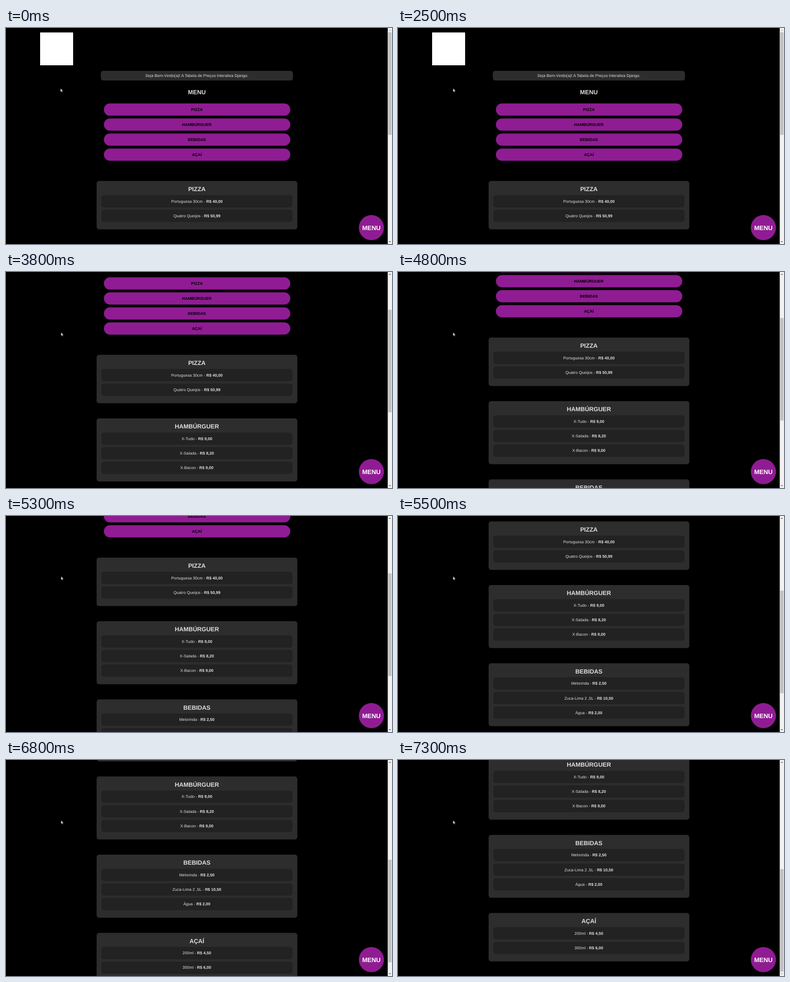
An HTML page that plays this animation: 690x388 px, repeating every 8 s.

```html
<!DOCTYPE html>
<html lang="pt-BR">
<head>
<meta charset="utf-8">
<title>Tabela de Preços</title>
<style>
  html, body { margin: 0; width: 100%; height: 100%; overflow: hidden; background: #000; }
  svg { display: block; width: 690px; height: 388px; }
  text {
    font: 7.19px "Liberation Sans", Arial, sans-serif;
    fill: #dedede;
    text-anchor: middle;
    text-rendering: geometricPrecision;
  }
  .bold { font-weight: bold; }
  .title { font-size: 10.78px; font-weight: bold; }
  .label { font-weight: bold; fill: #000; }
  .float { font-size: 11.23px; font-weight: bold; fill: #fff; }
  .panel { fill: #2d2d2d; }
  .item { fill: #222; }
  .purple { fill: #901c93; }
  #cursor { animation: nudge 8s step-end infinite; }
  @keyframes nudge {
    0% { transform: translate(97.5px, 108.5px); }
    31.25%, 100% { transform: translate(98.4px, 108.5px); }
  }
</style>
</head>
<body>
<svg viewBox="0 0 690 388">
  <rect width="690" height="388"/>
  <g id="page">
    <rect x="61" y="8" width="59" height="59" fill="#fff"/>
    <rect class="panel" x="169.5" y="77" width="343.5" height="17.2" rx="4.5"/>
    <text x="341.2" y="87.9">Seja Bem-Vindo(a)! A Tabela de Preços Interativa Django.</text>
    <text class="title" x="341.2" y="119.4">MENU</text>
  </g>
  <circle class="purple" cx="653.2" cy="358.6" r="22.5"/>
  <text class="float" x="653.2" y="362.7">MENU</text>
  <rect x="682.4" width="7.6" height="388" fill="#f1f1f1"/>
  <rect id="thumb" x="683.3" y="7.7" width="5.8" height="184.3" fill="#c1c1c1"/>
  <path id="up" d="M684.5 4.9h3.5l-1.75-1.9z"/>
  <path id="down" d="M684.5 383.1h3.5l-1.75 1.9z"/>
  <path id="cursor" d="M0 0v6.2l1.4-1.2 .95 2.1 1.1-.5-.95-2h1.9z"
        fill="#fff" stroke="#000" stroke-width=".4"/>
</svg>
<script>
  const NS = 'http://www.w3.org/2000/svg';
  const $ = id => document.getElementById(id);
  const page = $('page'), thumb = $('thumb'), upArrow = $('up'), downArrow = $('down');
  const MID = 341.2, LOOP = 8000, MAX = 395, TRAVEL = 188.3;

  function add(name, attrs, content = '', owner = page) {
    const el = document.createElementNS(NS, name);
    for (const key in attrs) el.setAttribute(key, attrs[key]);
    el.textContent = content;
    return owner.appendChild(el);
  }

  const box = (cls, x, y, width, height, rx) => add('rect', { class: cls, x, y, width, height, rx });
  const write = (cls, y, content) => add('text', { class: cls, x: MID, y }, content);

  const sections = [
    ['PIZZA', [['Portuguesa 30cm', '40,00'], ['Quatro Queijos', '50,99']]],
    ['HAMBÚRGUER', [['X-Tudo', '9,00'], ['X-Salada', '8,20'], ['X-Bacon', '9,00']]],
    ['BEBIDAS', [['Melorinda', '2,50'], ['Zuca-Lima 2 ,5L', '10,50'], ['Água', '2,00']]],
    ['AÇAÍ', [['200ml', '4,50'], ['300ml', '6,00']]]
  ];

  let panelY = 274.8;
  sections.forEach(([name, items], i) => {
    const buttonY = 135.6 + i * 26.95;
    box('purple', 175, buttonY, 333.2, 22, 11);
    write('label', buttonY + 13.5, name);

    const height = 34.6 + items.length * 26.2;
    box('panel', 162, panelY, 358.8, height, 4.5);
    write('title', panelY + 18.3, name);
    items.forEach(([food, price], k) => {
      const rowY = panelY + 25.4 + k * 26.2;
      box('item', 170.5, rowY, 341.6, 22, 4.5);
      const line = write('', rowY + 13.5, food + ' - ');
      add('tspan', { class: 'bold' }, 'R$ ' + price, line);
    });
    panelY += height + 27.2;
  });

  // Wheel scrolling, sampled ten times a second: start time, then positions
  const bursts = [
    [3000, 9, 34, 44, 52, 75, 87, 92, 106, 126, 133.5, 134.8],
    [4800, 157, 179.7],
    [5300, 200, 245, 265, 268.7, 269.5],
    [6500, 280, 325, 353, 359.4],
    [7200, 379, MAX]
  ];

  function scrollAt(time) {
    let pos = 0;
    for (const [start, ...steps] of bursts) {
      const k = Math.floor((time - start) / 100);
      if (k >= 0) pos = steps[Math.min(k, steps.length - 1)];
    }
    return pos;
  }

  const arrowColor = enabled => enabled ? '#505050' : '#a3a3a3';

  function draw(now) {
    const pos = scrollAt(now % LOOP);
    page.setAttribute('transform', `translate(0 ${-pos})`);
    thumb.setAttribute('y', 7.7 + pos / MAX * TRAVEL);
    upArrow.setAttribute('fill', arrowColor(pos > 0));
    downArrow.setAttribute('fill', arrowColor(pos < MAX));
    requestAnimationFrame(draw);
  }
  draw(performance.now());
</script>
</body>
</html>
```
